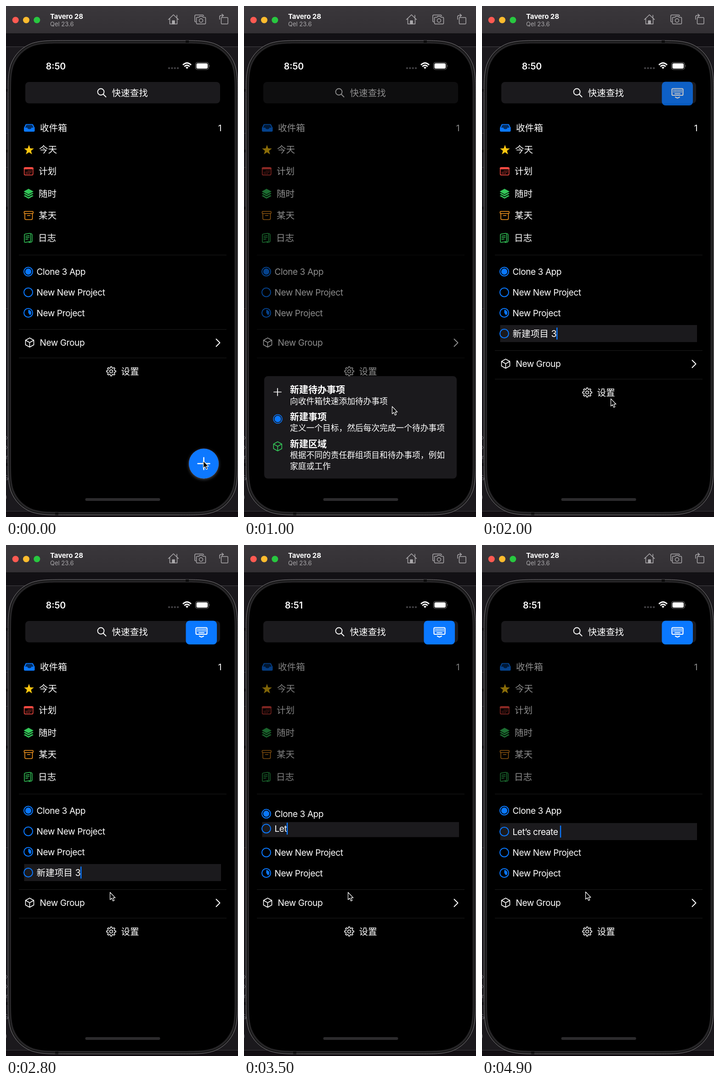
Write an HTML page that moves like this. It is 505 px wide and 1110 px high and loops after 5000 ms.

```html
<!DOCTYPE html>
<html lang="zh-CN">
<head>
<meta charset="utf-8">
<title>Task list</title>
<style>
html, body { margin: 0; width: 100%; height: 100%; overflow: hidden; background: #141216; }
svg { display: block; width: 505px; height: 1110px; }
text { font: 19px Inter, 'Noto Sans CJK SC', sans-serif; letter-spacing: -.4px; fill: #fff; white-space: pre; }
text.c { font: 19.6px 'Noto Sans CJK SC', 'Noto Sans CJK', sans-serif; letter-spacing: 0; }
text.m { font: 19.6px Inter, 'Noto Sans CJK SC', sans-serif; letter-spacing: 0; }
text.h { font: bold 20px 'Noto Sans CJK SC', 'Noto Sans CJK', sans-serif; letter-spacing: 0; }
text.s { font: 17.74px 'Noto Sans CJK SC', 'Noto Sans CJK', sans-serif; letter-spacing: 0; }
.l { fill: none; stroke-linecap: round; stroke-linejoin: round; }
</style>
</head>
<body>
<svg viewBox="0 0 505 1110">
  <defs>
    <filter id="glow" x="-30%" y="-30%" width="160%" height="170%">
      <feDropShadow dx="0" dy="2" stdDeviation="3" flood-color="#fff" flood-opacity=".3"/>
    </filter>
    <linearGradient id="bar" x2="0" y2="1">
      <stop stop-color="#3a373b"/><stop offset="1" stop-color="#333034"/>
    </linearGradient>
    <path id="cube" class="l" stroke-width="1.6" d="M0-10 9-5V5L0 10-9 5V-5ZM-9-5 0 0 9-5M0 0V10"/>
  </defs>

  <!-- desktop -->
  <rect width="505" height="1110" fill="#1b191d"/>
  <rect y="60" width="505" height="28" fill="#121014"/>
  <path d="M0 88.5H505" stroke="#444246"/>
  <rect y="1097" width="505" height="13" fill="#120e12"/>
  <path d="M0 1097.5H505M0 276.5H5M0 350.5H5M0 657.5H5" stroke="#3a383c"/>
  <path d="M0 183H5M0 315H5M0 439H5M0 996H5" stroke="#0d0c0e" stroke-width="6"/>
  <path class="l" d="M0 934 3 938 0 942M0 955 3 959 0 963M1 984V978Q2 977 3 978M3 1021Q0 1018-2 1021M0 1025H4V1029H1M0 1063Q2 1067 0 1071" stroke="#77757a"/>

  <!-- toolbar -->
  <rect width="505" height="60" fill="url(#bar)"/>
  <path d="M0 60H505" stroke="#0b0a0c"/>
  <circle cx="20.7" cy="30.5" r="7" fill="#ff5a52"/>
  <circle cx="44" cy="30.5" r="7" fill="#febc2e"/>
  <circle cx="67.3" cy="30.5" r="7" fill="#28c840"/>
  <text x="96" y="28" style="font-size:15px;font-weight:700;letter-spacing:-.1px">Tavero 28</text>
  <text x="96" y="44.3" style="font-size:13px;letter-spacing:0;fill:#aaa8ab">Qel 23.6</text>
  <g class="l" stroke="#aaa8ab" stroke-width="1.5">
    <path d="M353.5 29.5 364.5 19 375.5 29.5M356.5 27V39H372.5V27M372 25V20"/>
    <path fill="#aaa8ab" d="M362 39V32H367V39Z"/>
    <path d="M413 34.5Q411 34.5 411 32.5V21.5Q411 19.5 413 19.5H428Q430 19.5 430 21.5"/>
    <path d="M416.5 24.5H420L421.5 22.5H427.5L429 24.5H432.5Q434.5 24.5 434.5 26.5V37Q434.5 39 432.5 39H416.5Q414.5 39 414.5 37V26.5Q414.5 24.5 416.5 24.5Z"/>
    <circle cx="424.5" cy="31.5" r="4"/>
    <rect x="468.5" y="25" width="14.5" height="14" rx="1.5"/>
    <path d="M465 29V23.5Q465 20.5 468 20.5H473M470 17.5 473.5 20.5 470 23.5"/>
  </g>

  <!-- phone -->
  <path id="edge" fill="#262527" stroke="#79777a"/>
  <path id="rim" fill="none" stroke="#111" stroke-width="1.5"/>
  <path id="glass" fill="#000"/>
  <path d="M391 77.5H398M107 1103H114" stroke="#0c0c0c" stroke-width="5"/>
  <text id="clock" x="108.5" y="137.5" text-anchor="middle" style="font-size:19.5px;font-weight:600;letter-spacing:0"></text>
  <path d="M355 135h20" class="l" stroke="#464548" stroke-width="4.2" stroke-dasharray="0 6.35"/>
  <g fill="none" stroke="#fff" stroke-width="2.8">
    <path d="M385 128Q394 119.5 403 128M388.3 131.5Q394 126 399.7 131.5"/>
    <path d="M391 133.5Q394 131 397 133.5L394 136.8Z" fill="#fff" stroke="none"/>
  </g>
  <rect x="412.5" y="122.5" width="28.5" height="15.5" rx="4.5" fill="none" stroke="#777" stroke-width="1.2"/>
  <rect x="414.5" y="124.5" width="24.5" height="11.5" rx="3" fill="#fff"/>
  <path d="M442.5 128Q444.5 130.2 442.5 132.5Z" fill="#777"/>

  <g id="app">
    <rect x="42" y="165" width="424" height="46.5" rx="8" fill="#1b1a1d"/>
    <g class="l" stroke="#fff" stroke-width="1.8"><circle cx="206.5" cy="186.5" r="7"/><path d="M212 192 217.5 197.5"/></g>
    <text class="c" x="230.5" y="195.5">快速查找</text>

    <g id="lists">
      <path fill="#0a78ff" d="M44 256.5H57.5Q58.5 256.5 59 257.5L62.5 264.5V270.5Q62.5 273 60 273H41.5Q39 273 39 270.5V264.5L42.5 257.5Q43 256.5 44 256.5Z"/>
      <path d="M44.5 258.3H57L60 264.3H55.5Q55 267.5 51 267.5T46.3 264.3H41.5Z" fill="#000" opacity=".62"/>
      <path id="star" fill="#fec70f"/>
      <g class="l" stroke="#fa4a42" stroke-width="1.5">
        <rect x="39.7" y="350.7" width="19" height="16.5" rx="2.5"/>
        <path d="M40.5 352.7H58" stroke-width="4"/>
        <path d="M47.5 358.3H56M43 361.3H56M43 364.3H52" stroke-linecap="butt" stroke-dasharray="1.8 1.6"/>
      </g>
      <g fill="#34c759"><path d="M49 397 60 403 49 409 38.5 403Z"/>
        <path d="M38.5 407.5 41.5 406 49 410.5 57 406 60 407.5 49 413.5ZM38.5 412.5 41.5 411 49 415.5 57 411 60 412.5 49 418.5Z"/></g>
      <g class="l" stroke="#f6961f" stroke-width="1.6"><rect x="39.5" y="446.3" width="19.5" height="4.5" rx="1"/>
        <path d="M41 451V461.5Q41 464 43.5 464H55Q57.5 464 57.5 461.5V451M46.5 455.2H52.5"/></g>
      <path class="l" stroke="#34c759" stroke-width="1.5" d="M41.5 495.5 52 493.8Q53.5 493.6 53.5 495V510Q53.5 511.5 52 511.8L41.8 513.5Q40 513.8 40 512V497.3Q40 495.8 41.5 495.5ZM55 494.5Q56.8 495 56.8 497V510Q56.8 512.5 54.5 513L50 513.8M43 500 50.5 498.8M43 503.5 50.5 502.3M43 507 48 506.2"/>
      <g id="labels"></g>
      <text x="469" y="272" text-anchor="end">1</text>
    </g>
    <path d="M28 541H480" stroke="#1c1c1c"/>

    <g id="edit">
      <rect x="39.5" y="-18.5" width="428.5" height="37" fill="#1b1a1d"/>
      <circle cx="48.5" r="9.5" fill="none" stroke="#0a78ff" stroke-width="2"/>
      <text id="typed" x="66.5" y="7" xml:space="preserve"></text>
      <rect id="caret" y="-13" width="2.4" height="26" fill="#0a78ff"/>
    </g>
    <g id="rows"></g>

    <g id="below">
      <path d="M28 702.5H480M28 764.5H480" stroke="#1c1c1c"/>
      <use href="#cube" x="51.5" y="731" stroke="#fff"/>
      <text x="73.5" y="738">New Group</text>
      <path class="l" d="M457.5 723.5 465.5 731.5 457.5 739.5" stroke="#fff" stroke-width="1.9"/>
      <g transform="translate(229 793.5)" class="l" stroke="#fff" stroke-width="1.5"><path id="gear"/><circle r="3.3"/></g>
      <text class="c" x="250.5" y="801">设置</text>
    </g>
  </g>

  <g id="add">
    <circle cx="430.5" cy="994" r="32.5" fill="#0a78ff" filter="url(#glow)"/>
    <path d="M417.5 994H443.5M430.5 981V1007" class="l" stroke="#fff" stroke-width="2.4"/>
  </g>

  <g id="menu">
    <rect x="44" y="804" width="419" height="222.5" rx="8" fill="#1b1a1d"/>
    <path d="M65 838.5H81M73 830.5V846.5" class="l" stroke="#fff" stroke-width="1.7"/>
    <circle cx="73.5" cy="897" r="9.5" fill="none" stroke="#0a78ff" stroke-width="1.5"/>
    <circle cx="73.5" cy="897" r="7" fill="#0a78ff"/>
    <use href="#cube" x="73.3" y="956.5" stroke="#34c759"/>
    <text class="h" x="100" y="840.5">新建待办事项</text>
    <text class="s" x="100" y="864.5">向收件箱快速添加待办事项</text>
    <text class="h" x="100" y="899.5">新建事项</text>
    <text class="s" x="100" y="923.3">定义一个目标，然后每次完成一个待办事项</text>
    <text class="h" x="100" y="958.5">新建区域</text>
    <text class="s" x="100" y="982">根据不同的责任群组项目和待办事项，例如</text>
    <text class="s" x="100" y="1005.5">家庭或工作</text>
  </g>

  <g id="keys">
    <rect x="391.5" y="164.5" width="67.5" height="51.5" rx="8" fill="#0a78ff"/>
    <g class="l" stroke="#fff" stroke-width="2.2">
      <rect x="413.5" y="179.5" width="24" height="14.5" rx="2"/>
      <path d="M416.5 183.2H435M416.5 186.7H435" stroke-linecap="butt" stroke-dasharray="2.2 1.1"/>
      <path d="M420 190.5H431M421 198 425.5 200 430 198"/>
    </g>
  </g>
  <rect x="172.5" y="1069" width="163" height="6" rx="3" fill="#2c2b2d"/>
  <path id="pointer" d="M0 0V16L3.7 12.8 6.3 18.8 9 17.6 6.5 11.8H11.3Z" fill="#000" stroke="#fff" stroke-width="1.2" stroke-linejoin="round"/>
</svg>
<script>
const LOOP = 5000, STEP = 100;
const $ = id => document.getElementById(id);
const clamp = v => Math.max(0, Math.min(1, v));
const ramp = (t, a, b) => clamp((t - a) / (b - a));
const ease = x => x < .5 ? 4 * x ** 3 : 1 - 4 * (1 - x) ** 3;
const glide = (t, a, b) => ease(ramp(t, a, b));
const move = (el, x, y) => el.setAttribute('transform', `translate(${x} ${y})`);
const fade = (el, v) => el.setAttribute('opacity', v);

// Linear interpolation through [time, value] points
function track(points, t) {
  let i = 0;
  while (i < points.length - 2 && t >= points[i + 1][0]) i++;
  const [a, u] = points[i], [b, v] = points[i + 1];
  return u + (v - u) * ramp(t, a, b);
}

// Closed path around (x, y) from a radius rule
function ring(n, radius, x = 0, y = 0) {
  const pts = Array.from({ length: n }, (_, i) => {
    const a = i * 2 * Math.PI / n, r = radius(i, a);
    return `${(x + r * Math.sin(a)).toFixed(2)} ${(y - r * Math.cos(a)).toFixed(2)}`;
  });
  return 'M' + pts.join('L') + 'Z';
}
$('star').setAttribute('d', ring(10, i => i % 2 ? 4.7 : 11.4, 50, 313));
$('gear').setAttribute('d', ring(96, (i, a) => 8.7 + 1.4 * Math.max(-1, Math.min(1, 2.2 * Math.cos(8 * a)))));

// Rectangle whose corners ease into the sides
function smoothRect(x0, y0, x1, y1, r) {
  const half = [[1.5287, 0], [1.0885, 0], [.8684, 0], [.6315, .0749], [.3728, .1691]];
  const corner = [...half, ...half.map(([a, b]) => [b, a]).reverse()];
  const place = (right, bottom) => {
    const pts = corner.map(([a, b]) => [right ? x1 - a * r : x0 + a * r, bottom ? y1 - b * r : y0 + b * r]);
    if (right === bottom) pts.reverse();
    return `${pts[0]}C${pts.slice(1)}`;
  };
  return `M${place(0, 0)}L${place(1, 0)}L${place(1, 1)}L${place(0, 1)}Z`;
}
$('edge').setAttribute('d', smoothRect(4.5, 75, 504, 1105.5, 82));
$('rim').setAttribute('d', smoothRect(6.5, 77, 502, 1103.5, 80));
$('glass').setAttribute('d', smoothRect(11, 81.5, 497.5, 1099, 75.5));

$('labels').innerHTML = [
  ['收件箱', 74, 265], ['今天', 72, 312], ['计划', 71, 359],
  ['随时', 71, 407.5], ['某天', 71, 455], ['日志', 70, 503.5]
].map(([s, x, y]) => `<text class="c" x="${x}" y="${y + 7.2}">${s}</text>`).join('');

const projects = [
  ['Clone 3 App', 577, '<circle cx="48.5" r="6.7" fill="#0a78ff"/>'],
  ['New New Project', 622, ''],
  ['New Project', 666.5, '<path d="M48.5 0V-6.5A6.5 6.5 0 0 1 52.3 5.3Z" fill="#0a78ff"/>']
];
$('rows').innerHTML = projects.map(([name, , mark]) => `<g>
  <rect x="28" y="-18" width="452" height="36"/>
  <circle cx="48.5" r="9.5" fill="none" stroke="#0a78ff" stroke-width="2"/>${mark}
  <text x="66.5" y="7">${name}</text></g>`).join('');
const rows = [...$('rows').children];

const phrase = 'Let’s create ';
const strokes = [3150, 3350, 3480, 3620, 3780, 3920, 4150, 4280, 4400, 4500, 4620, 4740, 4850];
const dimming = [[3050, 1], [3200, .84], [3500, .5], [4000, .44], [4900, .55], [5000, .55]];
const pathX = [[0, 429.5], [300, 429.5], [650, 386], [1000, 322.5], [1250, 307.5], [1800, 307.5], [2400, 226.5], [4850, 226.5], [4900, 225.5], [5000, 225.5]];
const pathY = [[0, 988], [300, 988], [650, 944], [1000, 870], [1250, 902.5], [1800, 902.5], [2400, 754.5], [4850, 754.5], [4900, 753.5], [5000, 753.5]];

function draw(t) {
  const open = glide(t, 200, 500) * (1 - glide(t, 1300, 1500));
  const grow = glide(t, 1530, 1850);
  const up = glide(t, 3000, 3300), down = glide(t, 3300, 3600);

  $('clock').textContent = t < 3000 ? '8:50' : '8:51';
  fade($('app'), 1 - .45 * open);
  fade($('lists'), track(dimming, t));
  fade($('menu'), open);
  move($('menu'), 0, 20 * (1 - open));
  fade($('add'), (1 - open) * (1 - ramp(t, 1800, 2000)));
  fade($('keys'), ramp(t, 1850, 2050));
  move($('below'), 0, 46 * grow);

  rows.forEach((row, i) => move(row, 0, projects[i][1] + 46 * (up - (i ? 0 : down))));
  move($('edit'), 0, 711.5 - 132.5 * up + 43.5 * down);
  fade($('edit'), ramp(t, 1600, 1850));

  const text = $('typed'), fresh = t < 2950;
  text.setAttribute('class', fresh ? 'm' : '');
  text.textContent = fresh ? '新建项目 3' : phrase.slice(0, strokes.filter(s => s <= t).length);
  $('caret').setAttribute('x', 66.5 + text.getComputedTextLength() - .5);

  move($('pointer'), track(pathX, t), track(pathY, t));
}

const start = performance.now();
function tick() {
  const t = (performance.now() - start) % LOOP;
  draw(Math.floor(t / STEP) * STEP);
  requestAnimationFrame(tick);
}
tick();
</script>
</body>
</html>
```
